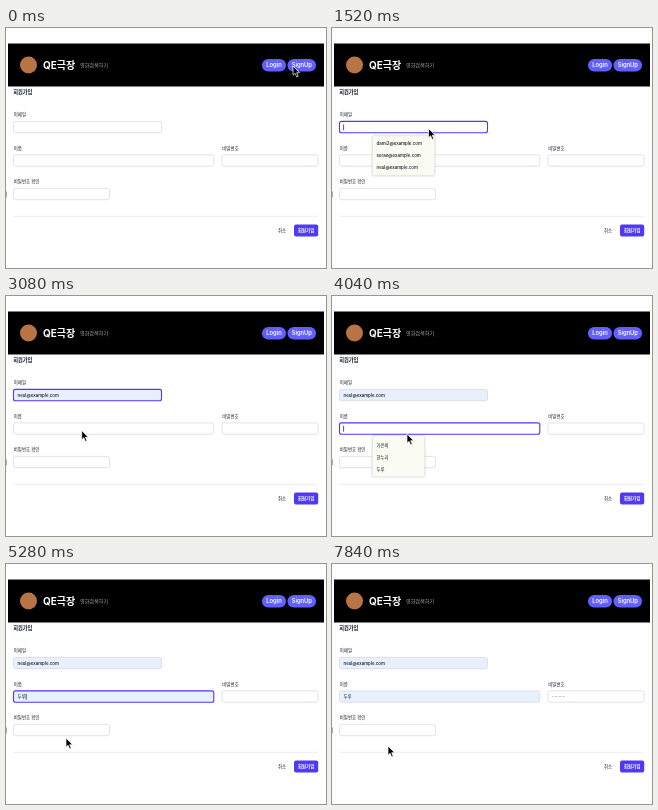
An HTML page for the animation above (8 s loop, 320 px wide and 240 px high).

```html
<!DOCTYPE html>
<html lang="ko">
<head>
<meta charset="utf-8">
<title>회원가입</title>
<style>
  html, body { margin: 0; width: 100%; height: 100%; overflow: hidden; background: #fff; }
  svg { display: block; width: 100%; height: 100%; }
  text { font-family: Inter, "Noto Sans CJK KR", "Noto Sans CJK", sans-serif; font-size: 4.4px; font-weight: 500; fill: #111827; }
  .field { fill: #fff; stroke: #d4d7dd; stroke-width: .7; }
  .field.filled { fill: #e8f0fe; }
  .field.focus { stroke: #4f39f6; stroke-width: 1.1; }
  .menu { fill: #fafcf3; stroke: #e2e4dc; stroke-width: .5; filter: drop-shadow(0 .6px 1px #0003); }
  .caret { stroke: #111; stroke-width: .7; }
</style>
</head>
<body>
<svg viewBox="0 0 320 240">
  <rect x="2" y="15.5" width="316" height="43" fill="#000"/>
  <circle cx="22.5" cy="37" r="8.5" fill="#b87445"/>
  <text x="37" y="40.7" style="font-size:10px;font-weight:700;fill:#fff">QE극장</text>
  <text x="74" y="38.8" style="font-size:5.1px;font-weight:400;fill:#a3a3a3">영화검색하기</text>
  <g fill="#615fff">
    <rect x="256" y="31" width="24" height="12.5" rx="6.25"/>
    <rect x="281.5" y="31" width="28.5" height="12.5" rx="6.25"/>
  </g>
  <g text-anchor="middle">
    <text x="268" y="39.2" style="font-size:5.8px;font-weight:600;fill:#fff">Login</text>
    <text x="295.8" y="39.2" style="font-size:5.8px;font-weight:600;fill:#fff">SignUp</text>
  </g>
  <text x="7.3" y="66.2" style="font-size:5.2px;font-weight:700">회원가입</text>
  <g id="form"></g>
  <path d="M7.5 188.3H312" stroke="#e3e5e9" stroke-width=".7"/>
  <text x="272" y="204">취소</text>
  <rect x="288" y="196.5" width="24.2" height="12" rx="2" fill="#4f39f6"/>
  <text x="300.1" y="204.1" text-anchor="middle" style="font-size:4.6px;font-weight:600;fill:#fff">회원가입</text>
  <g id="menus"></g>
  <path id="cursor" d="M0 0V9.2L2.1 7.3 3.7 10.9 5.2 10.2 3.7 6.7H6.6Z" fill="#000" stroke="#fff" stroke-width=".7" stroke-linejoin="round"/>
</svg>
<script>
const LOOP = 8000, STEP = 40, BLINK = 500;
const byId = id => document.getElementById(id);

function add(parent, tag, attrs, content = '') {
  const node = document.createElementNS('http://www.w3.org/2000/svg', tag);
  for (const key in attrs) node.setAttribute(key, attrs[key]);
  node.textContent = content;
  return parent.appendChild(node);
}

function makeField(label, x, y, width) {
  const form = byId('form');
  add(form, 'text', { x: x + .3, y: y - 5.4 }, label);
  return {
    box: add(form, 'rect', { class: 'field', x, y, width, height: 11.3, rx: 2 }),
    value: add(form, 'text', { x: x + 4, y: y + 7.3 }),
    caret: add(form, 'path', { class: 'caret', d: `M0 ${y + 3}v5.8` }),
    x: x + 4.1
  };
}

function makeMenu(x, y, width, height, first, items) {
  const menu = add(byId('menus'), 'g', {});
  add(menu, 'rect', { class: 'menu', x, y, width, height, rx: 1.5 });
  const rows = items.map((item, i) =>
    add(menu, 'text', { x: x + 4, y: first + i * 12 + 1.6 }, item));
  return { menu, rows };
}

const email = makeField('이메일', 7.5, 93.4, 148);
const name = makeField('이름', 7.5, 126.9, 200.3);
const password = makeField('비밀번호', 216, 126.9, 96);
makeField('비밀번호 확인', 7.5, 160.4, 96);

const emails = ['dami2@example.com', 'sorae@example.com', 'neul@example.com'];
const names = ['가온비', '한누리', '두루'];
const emailMenu = makeMenu(40.5, 108, 62, 39.5, 115.7, emails);
const nameMenu = makeMenu(40.5, 139.7, 52, 41, 149, names);

// Pointer stops: time, x, y
const path = [
  [0, 287, 38], [480, 287, 38], [720, 143, 88], [920, 143, 88],
  [1000, 131, 97], [1320, 101, 100], [1720, 92, 101], [1800, 92, 101],
  [2360, 84, 112], [2600, 74, 138], [2640, 74, 138], [3440, 77, 132],
  [3480, 77, 132], [4040, 75, 138], [4480, 75, 138], [4960, 60, 174],
  [5600, 60, 174], [6320, 262, 131], [6400, 262, 131], [7400, 262, 131],
  [7840, 56, 182], [LOOP, 56, 182]
];

function pointerAt(t) {
  const i = path.findIndex(stop => stop[0] > t);
  const [t0, x0, y0] = path[i - 1], [t1, x1, y1] = path[i];
  const p = (t - t0) / (t1 - t0), e = p * p * (3 - 2 * p);
  return [x0 + (x1 - x0) * e, y0 + (y1 - y0) * e];
}

const within = (t, from, to) => t >= from && t < to;
const show = (node, on) => node.style.display = on ? '' : 'none';

function updateField(field, text, filled, focused, blinkAge) {
  field.box.classList.toggle('filled', filled);
  field.box.classList.toggle('focus', focused);
  if (field.value.textContent !== text) field.value.textContent = text;
  const caretOn = focused && Math.floor(blinkAge / BLINK) % 2 === 0;
  show(field.caret, caretOn);
  if (caretOn) {
    const end = text ? field.value.getComputedTextLength() + .5 : 0;
    field.caret.setAttribute('transform', `translate(${field.x + end} 0)`);
  }
}

function updateMenu({ menu, rows }, visible, y) {
  show(menu, visible);
  rows.forEach(row => {
    const hovered = Math.abs(y + 2 - row.getAttribute('y')) < 6;
    row.style.fontWeight = hovered ? 600 : 500;
  });
}

function draw(time) {
  const t = Math.floor(time % LOOP / STEP) * STEP;
  const [x, y] = pointerAt(t);
  byId('cursor').setAttribute('transform', `translate(${x} ${y})`);
  show(byId('cursor'), !within(t, 6520, 7400));

  const hasEmail = t >= 2520, hasName = t >= 4800;
  updateField(email, hasEmail ? emails[2] : '', hasEmail, within(t, 1320, 3760), t - 1320);
  updateField(name, hasName ? names[2] : '', hasName, within(t, 3760, 6320), t - (t < 5240 ? 3780 - STEP / 2 : 5240));
  const typed = t < 6520 ? 0 : Math.min(10, Math.floor((t - 6520) / 56) + 1);
  updateField(password, '·'.repeat(typed), false, within(t, 6320, 7760), t - 6300);

  updateMenu(emailMenu, within(t, 1360, 2680), y);
  updateMenu(nameMenu, within(t, 3800, 5280), y);
}

function frame() {
  draw(performance.now());
  requestAnimationFrame(frame);
}
frame();
</script>
</body>
</html>
```
